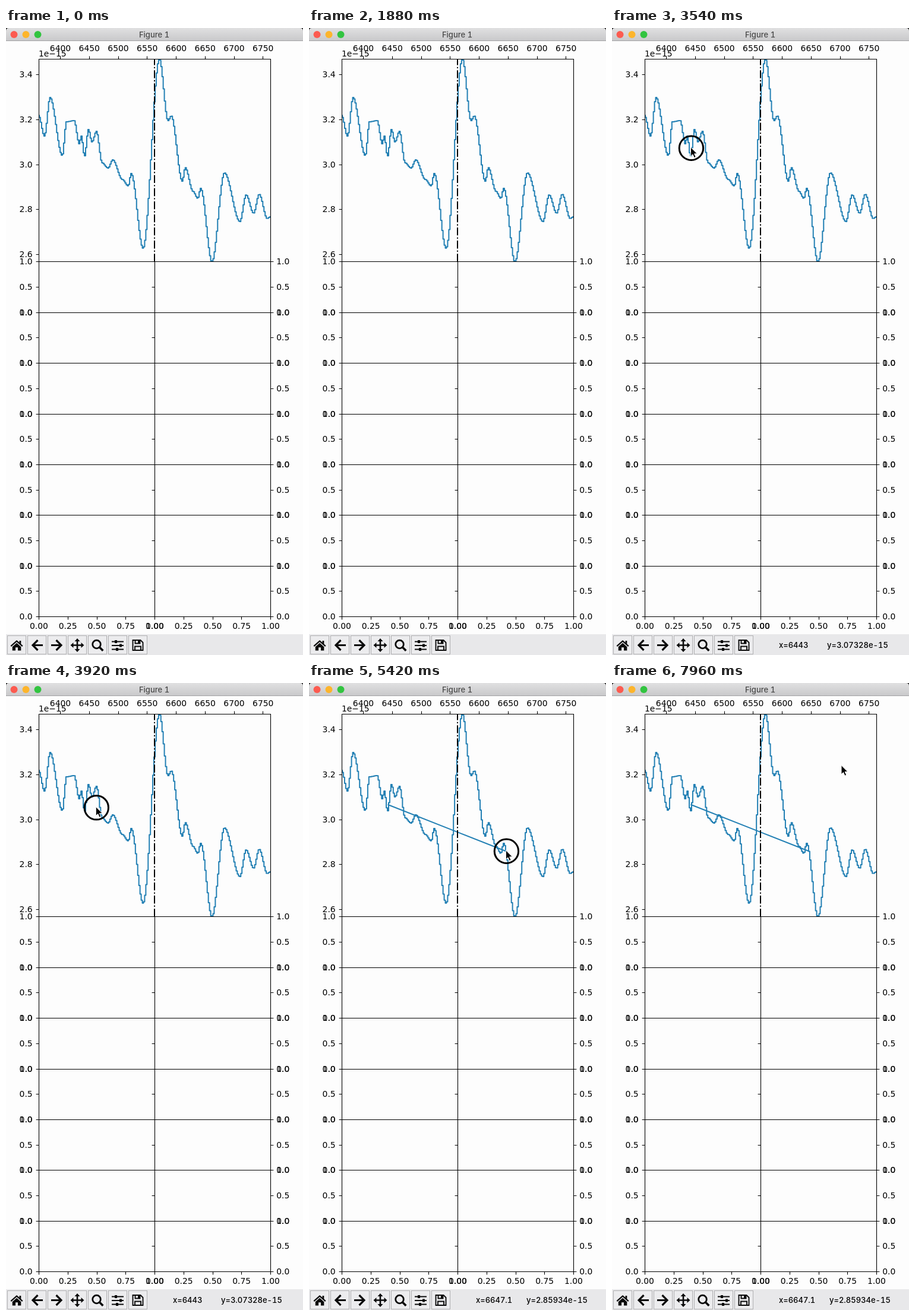
An HTML page for the animation above (8000 ms loop, 500 px wide and 1056 px high).

```html
<!DOCTYPE html>
<html lang="en">
<head>
<meta charset="utf-8">
<title>Figure 1</title>
<style>
  html, body { margin: 0; width: 100%; height: 100%; overflow: hidden; background: #fdfdfd; }
  svg { display: block; width: 500px; height: 1056px; }
  .plot text { font: 13.89px "DejaVu Sans", sans-serif; }
  .ui { font: 500 13px Inter, sans-serif; font-variant-numeric: tabular-nums; }
  .axis { stroke: #000; stroke-width: 1.1; fill: none; }
  .line { stroke: #2380b4; stroke-width: 2; fill: none; stroke-linejoin: round; }
  .btn { fill: #ececee; stroke: #b0b0b2; }
  .icon { fill: none; stroke: #0b0b0b; stroke-width: 3.2; }
  .icon .solid { fill: #0b0b0b; stroke: none; }
</style>
</head>
<body>
<svg viewBox="0 0 500 1056">
  <defs>
    <linearGradient id="bar" x2="0" y2="1">
      <stop offset="0" stop-color="#e0e0e1"/>
      <stop offset="1" stop-color="#c8c8ca"/>
    </linearGradient>
    <clipPath id="top"><rect x="55" y="52" width="390" height="341.5"/></clipPath>
  </defs>

  <rect width="500" height="1056" fill="#fdfdfd"/>
  <rect width="500" height="22" fill="url(#bar)"/>
  <path d="M0 21.5H500" stroke="#a2a2a4"/>
  <path d="M0 0H5Q0 0 0 5ZM500 0H495Q500 0 500 5Z" fill="#222"/>
  <circle cx="13.5" cy="11" r="6" fill="#fc5b50"/>
  <circle cx="33.5" cy="11" r="6" fill="#fdb52c"/>
  <circle cx="53.5" cy="11" r="6" fill="#32c440"/>
  <text class="ui" x="249.5" y="16" text-anchor="middle" fill="#484848">Figure 1</text>

  <g class="plot" id="plot">
    <g clip-path="url(#top)">
      <path class="line" id="curve"/>
      <path class="line" id="chord"/>
      <path d="M250 393.5V52" stroke="#000" stroke-width="2" stroke-dasharray="13.33 3.33 2.08 3.33"/>
    </g>
    <path class="axis" id="axes"/>
  </g>

  <rect y="1021" width="500" height="35" fill="#e8e8ea"/>
  <g id="buttons"></g>
  <g class="icon">
    <g transform="translate(18 1040)" class="solid">
      <path d="M0 -9L10.5 .3L9 2L0 -6L-9 2L-10.5 .3ZM4.5 -8H7.3V-2L4.5 -4.5Z"/>
      <path d="M0 -4.3L7.3 2.2V8.5H2V3.2H-2V8.5H-7.3V2.2Z"/>
    </g>
    <path d="M62 1039.5H46M53.5 1031L45 1039.5L53.5 1048"/>
    <path d="M76 1039.5H92M84.5 1031L93 1039.5L84.5 1048"/>
    <g transform="translate(120 1039.5)">
      <path d="M-8 0H8M0 -8V8" stroke-width="2.6"/>
      <path class="solid" d="M0 -11.5L4.5 -6.5H-4.5ZM0 11.5L4.5 6.5H-4.5ZM-11.5 0L-6.5 -4.5V4.5ZM11.5 0L6.5 -4.5V4.5Z"/>
    </g>
    <g transform="translate(154 1039.5)">
      <circle cx="-1.5" cy="-1.5" r="6.8" stroke-width="2.8"/>
      <path d="M3.5 3.5L9.3 9.3" stroke-width="3.6"/>
    </g>
    <g transform="translate(188 1039.5)">
      <path d="M-10 -6H10M-10 .5H10M-10 7H10" stroke-width="1.8"/>
      <path class="solid" d="M-5 -8.5H-1V-3.5H-5ZM3 -2H7V3H3ZM-3 4.5H1V9.5H-3Z"/>
    </g>
    <g transform="translate(222 1039.5)" stroke-width="1.9">
      <path d="M-8.5 -8.5H4.5L8.5 -4.5V8.5H-8.5Z"/>
      <path d="M-5 8V2H5V8M-4.5 -8V-3H3.5V-8"/>
      <path class="solid" d="M0 -8H3V-3.5H0Z"/>
    </g>
  </g>
  <text class="ui" id="xText" x="281" y="1044"></text>
  <text class="ui" id="yText" y="1044"></text>

  <g id="pointer">
    <circle id="ring" r="20.2" fill="none" stroke="#000" stroke-width="3"/>
    <path d="M-1 -1.5V13.8L2.5 10.6L5 16.3L7.7 15.1L5.2 9.6H10Z" fill="#000" stroke="#fff"/>
  </g>
</svg>

<script>
const $ = id => document.getElementById(id);
const NS = 'http://www.w3.org/2000/svg';

function add(parent, tag, attrs, text) {
  const el = document.createElementNS(NS, tag);
  for (const k in attrs) el.setAttribute(k, attrs[k]);
  if (text) el.textContent = text;
  parent.append(el);
}
const label = (x, y, s, anchor = 'middle') =>
  add($('plot'), 'text', { x, y, 'text-anchor': anchor }, s);
const smooth = p => p * p * (3 - 2 * p);
const snap = v => Math.floor(v) + 0.5;

// Axes, ticks and labels
const LEFT = 55.5, CENTER = 250.5, RIGHT = 445.5, TOP = 52.5, ROWS = 7, TICK = 4.9;
const rowY = r => snap(393.9 + r * 85.38);
const END = rowY(ROWS);
let axes = `M${LEFT} ${TOP}H${RIGHT}V${END}H${LEFT}ZM${CENTER} ${rowY(0)}V${END}`;
const tickX = (x, y, d) => axes += `M${snap(x)} ${y}v${d}`;
const tickY = (x, y, d) => axes += `M${x} ${snap(y)}h${d}`;

for (let i = 0; i < 8; i++) {
  const x = 91.5 + i * 48.75;
  tickX(x, TOP, -TICK);
  label(x, 39, String(6400 + i * 50));
}
for (let i = 0; i < 5; i++) {
  const y = 78.6 + i * 75.7;
  tickY(LEFT, y, -TICK);
  label(44.7, Math.floor(y) + 5, (3.4 - i * 0.2).toFixed(1), 'end');
}
label(55, 48, '1e\u221215', 'start');

for (let r = 0; r < ROWS; r++) {
  axes += `M${LEFT} ${rowY(r)}H${RIGHT}`;
  for (let k = 0; k < 3; k++) {
    const y = rowY(r + k / 2), s = (1 - k / 2).toFixed(1);
    tickY(LEFT, y, -TICK);
    tickY(CENTER, y, -TICK);
    tickY(RIGHT, y, TICK);
    label(44.7, y + 4.5, s, 'end');
    label(455.2, y + 4.5, s, 'start');
  }
}
for (const left of [LEFT, CENTER])
  for (let k = 0; k < 5; k++) {
    const x = left + k * 48.75;
    tickX(x, END, TICK);
    label(x, 1012, (k / 4).toFixed(2));
  }
$('axes').setAttribute('d', axes);

for (let i = 0; i < 7; i++)
  add($('buttons'), 'rect', { class: 'btn', x: 2.5 + i * 34, y: 1023.5, width: 31, height: 31 });

// Spectrum: eased between its peaks and dips, drawn as a fine staircase
const turns = [
  [55, 147], [65, 182], [74.5, 117], [95, 215], [102, 158], [115, 156], [123.5, 195], [127, 182],
  [132.5, 216], [139, 171], [145, 192], [152.5, 174], [162, 227], [172, 236], [180, 222],
  [196, 255], [206, 266], [211, 245], [231, 371], [258.5, 52], [273, 156], [278.5, 148],
  [297, 258], [302, 235], [315, 275], [323, 287], [328, 270], [347, 394], [368, 244],
  [394, 326], [404.5, 281], [417, 312], [426.5, 280], [440, 321], [445, 318]];

function flux(x) {
  const i = turns.findIndex(p => p[0] >= x) || 1;
  const [x0, y0] = turns[i - 1], [x1, y1] = turns[i];
  return y0 + (y1 - y0) * smooth((x - x0) / (x1 - x0));
}

const BIN = 1.95;
let stairs = 'M55 147';
for (let k = 0; k < 200; k++) {
  const x = 55 + k * BIN;
  stairs += `V${flux(x).toFixed(1)}H${(x + BIN / 2).toFixed(2)}`;
}
$('curve').setAttribute('d', stairs + 'V318H445');

// Pointer: enter, press, drag, release, leave
const LOOP = 8000, ENTER = 2300, PRESS = 3400, DRAG = 3750, DROP = 4750, RELEASE = 5700;
const A = [133.425, 202.263], B = [332.42, 283.24];
const moves = [
  { at: ENTER, len: 900, from: [-14, 245], to: A },
  { at: DRAG, len: 900, from: A, to: B },
  { at: 5900, len: 750, from: B, to: [387, 140] }
];

function pointerAt(t) {
  const m = moves.filter(m => t >= m.at).pop() || moves[0];
  const e = smooth(Math.max(0, Math.min(1, (t - m.at) / m.len)));
  return m.from.map((v, i) => v + (m.to[i] - v) * e);
}

function readout(t) {
  const [x, y] = t < DRAG ? pointerAt(t) : t < DROP ? A : B;
  if (t < ENTER || x < LEFT) return ['', ''];
  const wave = +(6400 + (x - 91.5) / 0.975).toFixed(1);
  return ['x=' + wave, 'y=' + +(3 + (230 - y) / 378.5).toFixed(5) + 'e-15'];
}

function draw(t) {
  const [x, y] = pointerAt(t);
  $('pointer').setAttribute('transform', `translate(${x.toFixed(2)} ${y.toFixed(2)})`);
  $('pointer').style.display = t < ENTER ? 'none' : '';
  $('ring').style.display = t >= PRESS && t < RELEASE ? '' : 'none';

  // The chord is redrawn only every 250 ms while dragging
  const drawn = DRAG + Math.floor((Math.min(t, DROP) - DRAG) / 250) * 250;
  const [ex, ey] = pointerAt(drawn);
  $('chord').setAttribute('d', drawn > DRAG ? `M132.5 204.8L${ex - 1} ${ey}` : '');

  const [xs, ys] = readout(t);
  $('xText').textContent = xs;
  $('yText').textContent = ys;
  $('yText').setAttribute('x', xs.includes('.') ? 366 : 362);
}

const start = performance.now();
function tick(now) {
  draw(Math.max(0, now - start) % LOOP);
  requestAnimationFrame(tick);
}
draw(0);
requestAnimationFrame(tick);
</script>
</body>
</html>
```
